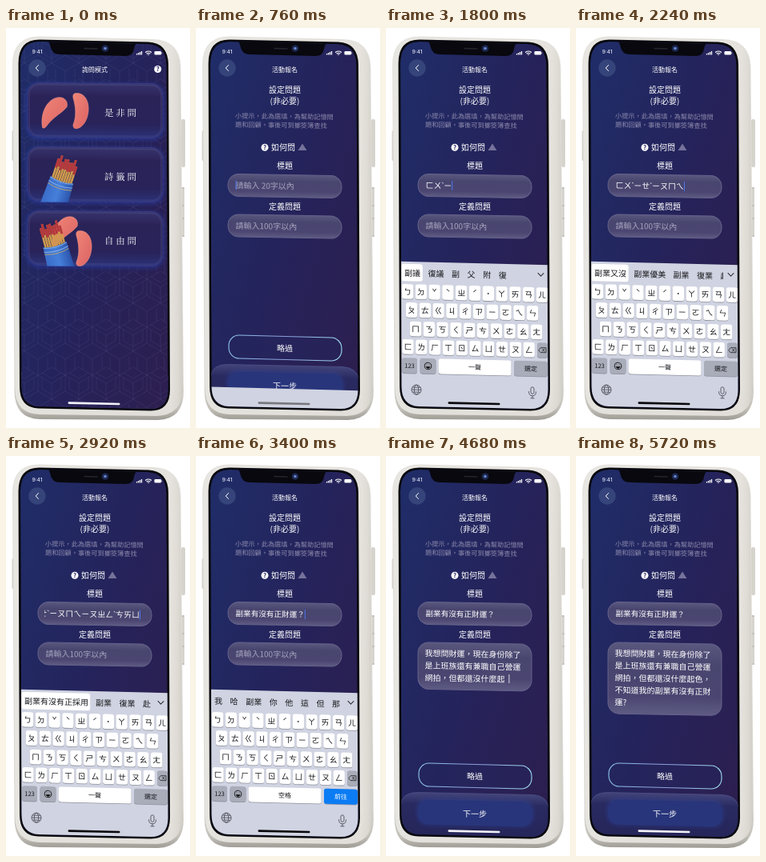
Write an HTML page that moves like this. It is 230 by 500 pixels and loops after 5760 ms.

```html
<!DOCTYPE html>
<html lang="zh-Hant">
<head>
<meta charset="utf-8">
<style>
html, body { margin: 0; width: 100%; height: 100%; overflow: hidden; background: #fff; }
svg { display: block; width: 230px; height: 500px; }
text { font-family: "Noto Sans CJK TC", "Noto Sans CJK", sans-serif; font-size: 10px; fill: #fff; }
.mid { text-anchor: middle; }
.dark { fill: #17181c; }
.hint { fill: #8d8aac; font-size: 8.2px; }
.ghost { fill: #a5a3bd; }
.typed { font-family: "Noto Sans", "Noto Sans CJK TC", sans-serif; }
.title { font-size: 9.6px; }
.serif { font-family: "Noto Serif CJK TC", "Noto Serif", "Noto Sans CJK TC", serif; font-size: 11.5px; letter-spacing: 2.8px; }
.line { fill: none; stroke: #fff; stroke-linecap: round; stroke-linejoin: round; }
</style>
</head>
<body>
<svg id="stage" viewBox="0 0 230 500"></svg>
<script>
const LOOP = 5760;
const ZHUYIN = 'ㄈㄨˋㄧㄝˋㄧㄡㄇㄟㄧㄡㄓㄥˋㄘㄞㄩㄣˋ';
const TITLE = '副業有沒有正財運';
const STORY = '我想問財運，現在身份除了是上班族還有兼職自己營運網拍，但都還沒什麼起色，不知道我的副業有沒有正財運?';
const PER_LINE = 12, LINE = 15.3;
const IDLE_WORDS = '我 哈 副業 你 他 這 但 那';
const SUGGESTIONS = [
  [1, '非 分 放 飛 復 法 發'],
  [2, '夫 副 父 附 復 福 富'],
  [4, '副議 復議 副 父 附 復'],
  [5, '副業 復業 副 父 附 復'],
  [7, '副業以 副業 復業 副 父'],
  [8, '副業有 副業 復業 副 父'],
  [10, '副業又沒 副業優美 副業 復業 趕'],
  [12, '副業有沒有 副業 復業 趕 赴'],
  [14, '副業有沒有正 副業 復業 赴'],
  [17, '副業有沒有正採用 副業 復業 赴'],
  [20, '副業有沒有正財運 副業 復業 赴']
];

// The screen leans slightly, more so towards the bottom.
const tilt = (y, body) => {
  const s = 0.008 + y * 0.000043;
  return `<g transform="matrix(1 ${s} 0 1 0 ${-s * 111})">${body}</g>`;
};
const label = (x, y, str, cls = '', extra = '') => `<text x="${x}" y="${y}" class="${cls}" ${extra}>${str}</text>`;
const box = (x, y, w, h, r, fill, extra = '') =>
  `<rect x="${x}" y="${y}" width="${w}" height="${h}" rx="${r}" fill="${fill}" ${extra}/>`;
const path = (d, extra = '') => `<path d="${d}" ${extra}/>`;
const gradient = (id, dir, ...colors) => `<linearGradient id="${id}" ${dir}>` +
  colors.map(([at, c]) => `<stop offset="${at}" stop-color="${c}"/>`).join('') + '</linearGradient>';
const DOWN = 'x2="0" y2="1"', ACROSS = 'x2="1"', DIAGONAL = 'x2="1" y2="1"';
const badge = (x, y) => `<circle cx="${x}" cy="${y}" r="4.5" fill="#fff"/>` +
  label(x, y + 2.8, '?', 'mid', 'style="fill:#28235f;font-size:8px;font-weight:800"');

const SCREEN = 'M18 44Q18 17 42 17L177 20Q200 21 200.500 46L202.500 452Q202.500 476 181 476L41 473Q19.500 472 19.500 448Z';

const defs = () => `<defs>
  <clipPath id="screen"><path d="${SCREEN}"/></clipPath>
  <clipPath id="words"><rect x="18" y="290" width="166" height="32"/></clipPath>
  <clipPath id="field"><rect x="48" y="184" width="121" height="28"/></clipPath>` +
  gradient('body', DOWN, [0, '#e4e1dc'], [0.9, '#dad7d1'], [0.97, '#c3c0b9'], [1, '#9f9c95']) +
  gradient('side', ACROSS, [0, '#e9e7e2'], [0.93, '#e6e3de'], [0.97, '#dedbd5'], [1, '#cfccc6']) +
  gradient('night', 'x1="0" y1=".15" x2="1" y2=".85"', [0, '#202c67'], [0.5, '#25235b'], [1, '#2c1f50']) +
  gradient('card', DOWN, [0, '#37346c'], [0.25, '#2a2358'], [0.75, '#29235a'], [1, '#2b3277']) +
  gradient('glass', DOWN, [0, '#5b587f'], [0.3, '#48456f'], [0.75, '#4a4671'], [1, '#5e5b83']) +
  gradient('dock', DOWN, [0, '#43457a'], [0.25, '#292a60'], [1, '#252559']) +
  gradient('rim', ACROSS, [0, '#8fc4ee'], [0.5, '#8a9bd8'], [1, '#9fdcf2']) +
  gradient('coral', DIAGONAL, [0, '#ee8577'], [1, '#dc6263']) +
  gradient('cup', ACROSS, [0, '#3a6cc8'], [0.5, '#457fda'], [1, '#2a51a8']) + `
  <pattern id="cubes" width="34" height="60" patternUnits="userSpaceOnUse" patternTransform="translate(6 4)">
    <path d="M17 0L34 10V30L17 40L0 30V10ZM0 10L17 20L34 10M17 20V40M17 40L0 50V60M17 40L34 50V60M0 0V10M34 0V10
      M5 13V27L17 34L29 27V13M5 7L17 14L29 7M12 47V60M22 47V60M12 0V3M22 0V3" fill="none" stroke="#6d69a8" stroke-width=".5" opacity=".3"/></pattern>
  <filter id="blur" x="-20%" y="-30%" width="140%" height="160%"><feGaussianBlur stdDeviation="2.500"/></filter>
</defs>`;

const phone = () =>
  box(219, 114, 5, 60, 2, '#d6d3cd') + box(219.5, 199, 3.5, 62, 1.5, '#d6d3cd') +
  path('M219 200H223M219 222H223M219 238H223M219 260H223', 'stroke="#aaa69f" stroke-width=".8"') +
  box(7.5, 128, 3, 38, 1.5, '#cfccc6') +
  path('M8 46Q8 10.500 42 10.500L184 14Q217 15 218.500 48L222 454Q222 489 190 490L42 489Q11 488 10.500 454Z', 'fill="url(#body)"') +
  path('M9 46Q9 11.500 42 11.500L184 15Q216 16 217.500 48L221 452Q220 484 188 485L42 483Q12 482 11.500 452Z', 'fill="url(#side)" opacity=".9"') +
  path('M15.500 44Q15.500 14.500 42 14.500L178 17.500Q202.500 18.500 203 46L205 452Q205 478.500 181 478.500L40 475.500Q17 474.500 17 448Z', 'fill="#08080e"');

const statusBar = () =>
  path('M51 14Q55 19 55.500 23Q57 33 68 33L149 35Q159 35 160 26Q161 20 165 18L165 14Z', 'fill="#08080e"') +
  path('M98 25.500L114 26', 'stroke="#25252c" stroke-width="1.5" stroke-linecap="round"') +
  '<circle cx="124" cy="25.5" r="4.3" fill="#1b2750"/><circle cx="124" cy="25.5" r="1.8" fill="#6a86c8"/>' +
  label(39, 32, '9:41', 'mid', 'style="font-family:Inter,sans-serif;font-size:6.700px;font-weight:500;fill:#d9dcec"') +
  path('M163.500 33.500V32M165.500 33.500V31M167.500 33.500V30M169.500 33.500V29', 'stroke="#fff" stroke-width="1.3"') +
  path('M174.500 30.300Q178 27.600 181.500 30.300M176 32Q178 30.500 180 32', 'class="line" stroke-width="1.1"') +
  '<circle cx="178" cy="33.2" r=".8" fill="#fff"/>' +
  box(185.5, 29, 8.5, 4.6, 1.3, '#fff') + box(194.4, 30.5, 0.7, 1.8, 0.3, '#fff');

const backButton = () => '<circle cx="39" cy="50" r="10.7" fill="#3d4c80" opacity=".75"/>' +
  path('M40.500 46.500L37.200 50L40.500 53.500', 'class="line" stroke-width="1"');
const heading = str => label(111, 54.8, str, 'mid', 'style="font-size:8px;font-weight:500"');

const moonLeft = 'M45.500 125C42 104 54 87 67 87C74 87 78 93 76 99C70 107 59 111 50 124Q47 127 45.500 125Z';
const moonRight = 'M86 82C98 80 104 91 103 104C102 116 95 126 87 126C83 125 83.500 121 85 118C88 109 87 98 84 88Q83 83 86 82Z';
const moon = (d, dx = 0, dy = 0) =>
  path(d, `fill="url(#coral)" stroke="#f09a8c" stroke-width=".5" transform="translate(${dx} ${dy})"`);

function stickCup(dx, dy, lean) {
  let sticks = '';
  for (let i = 0; i < 9; i++) {
    const x = -12 + i * 3, top = -24 - 3 * Math.sin(i * 2.1) - (i % 2) * 2;
    sticks += path(`M${x} 3V${top}`, 'stroke="#cf9a4c" stroke-width="2.6"') +
      path(`M${x} ${top * 0.5}V${top}`, 'stroke="#b5353d" stroke-width="2.8"');
  }
  return `<g transform="translate(${dx} ${dy}) rotate(${lean})">${sticks}` +
    path('M-15 0Q0 5 15 0L17 40H-17Z', 'fill="url(#cup)"') +
    path('M-15 1Q0 6 15 1M-15.500 6Q0 11 15.500 6', 'fill="none" stroke="#86aee6" stroke-width="1"') +
    path('M-15.500 9Q0 14 15.500 9', 'fill="none" stroke="#c9a866" stroke-width=".8"') + '</g>';
}

function menuCard(y, str, art) {
  const id = 'c' + y;
  return `<clipPath id="${id}">${box(26, y, 171, 69, 15, '#000')}</clipPath>` +
    box(25, y, 173, 71, 16, '#2b40b0', 'opacity=".5" filter="url(#blur)"') +
    box(27, y, 169, 68, 14, 'url(#card)', 'stroke="#39408a" stroke-width=".8"') +
    box(29, y + 2, 165, 64, 12, 'none', 'stroke="#6a67a5" stroke-width="2" opacity=".2"') +
    `<g clip-path="url(#${id})">${art}</g>` + label(123, y + 41, str, 'serif');
}

const menuPage = () => path(SCREEN, 'fill="url(#night)"') + path(SCREEN, 'fill="url(#cubes)"') +
  backButton() + heading('詢問模式') + badge(189.7, 51.5) +
  tilt(0, menuCard(69, '是非問', moon(moonLeft) + moon(moonRight)) +
    menuCard(149, '詩籤問', stickCup(70, 190, 18)) +
    menuCard(229, '自由問', moon(moonLeft, 13, 149) + moon(moonRight, 4, 172) + stickCup(61, 271, -15)));

const glassBox = (y, id) => box(40, y, 142, 28, 13.5, 'url(#glass)', `id="${id}" stroke="#65628a" stroke-width="1"`);

const formPage = () => path(SCREEN, 'fill="url(#night)"') + backButton() + heading('活動報名') +
  label(111, 81, '設定問題', 'mid', 'font-weight="500"') + label(111, 94.5, '(非必要)', 'mid', 'font-weight="500"') +
  tilt(112, label(49, 113.5, '小提示，此為選填，為幫助記憶問', 'hint') + label(49, 124.5, '題和回顧，事後可到擲筊簿查找', 'hint')) +
  badge(86, 149.3) + label(94, 153, '如何問', '', 'font-weight="500"') +
  path('M133 144.500L138.500 153H127.500Z', 'fill="#75729b"') +
  label(111, 175.7, '標題', 'mid', 'font-weight="500"') +
  tilt(198, glassBox(183.5, 'titleBox') + `<g clip-path="url(#field)">${label(49, 201.3, '', '', 'id="title"')}</g>` +
    box(49, 191.5, 0.9, 12, 0, '#4f7df5', 'id="caret"')) +
  label(111, 226.7, '定義問題', 'mid', 'font-weight="500"') +
  tilt(248, glassBox(234, 'storyBox') + '<g id="story"></g>' + box(49, 241.5, 0.8, 11, 0, '#fff', 'id="storyCaret"')) +
  tilt(400, box(41, 385.5, 141, 29, 13, '#25265f', 'fill-opacity=".5" stroke="url(#rim)" stroke-width="1.1"') +
    label(111, 404, '略過', 'mid')) +
  tilt(300, path('M18 440Q19 422 40 422H182Q202 422 204 440V480H18Z', 'fill="url(#dock)" stroke="#4d4f85" stroke-width=".8"') +
    box(38, 429, 147, 34, 14, '#2f48a8', 'opacity=".35" filter="url(#blur)"') +
    box(40, 431, 143, 31, 13, '#28357b') + label(111, 451, '下一步', 'mid', 'font-weight="500"'));

const key = (x, y, w, h, fill = '#fff') => box(x - w / 2, y - h / 2 + 0.8, w, h, 3, '#8e919d') + box(x - w / 2, y - h / 2, w, h, 3, fill);
const keyRow = (chars, x0, y) => [...chars].map((c, i) => {
  const x = x0 + i * 16.8;
  return key(x, y, 14.4, 18.6) + label(x, y + 3.8, c, 'mid dark');
}).join('');

const keyboard = () => tilt(400,
  box(10, 294, 200, 200, 0, '#d0d3e1') + '<g id="candidates"><g id="wordList" clip-path="url(#words)"></g>' +
  path('M190 304.500L193.500 308L197 304.500', 'class="line" style="stroke:#33353c" stroke-width="1.1"') + '</g>' +
  keyRow('ㄅㄉˇˋㄓˊ˙ㄚㄞㄢㄦ', 27, 331.5) + keyRow('ㄆㄊㄍㄐㄔㄗㄧㄛㄟㄣ', 32, 354.5) +
  keyRow('ㄇㄋㄎㄑㄕㄘㄨㄜㄠㄤ', 37, 378) + keyRow('ㄈㄌㄏㄒㄖㄙㄩㄝㄡㄥ', 27.5, 400.5) +
  key(195.5, 400.5, 13, 18.6, '#a9adba') +
  path('M191 400.500L193.500 397.500H200V403.500H193.500ZM195.500 399L198 402M198 399L195.500 402', 'class="line" style="stroke:#222" stroke-width=".8"') +
  key(29.5, 424, 19, 19, '#a9adba') + label(29.5, 427, '123', 'mid dark', 'style="font-size:7.500px"') +
  key(52.5, 424, 20, 19, '#a9adba') + '<circle cx="52.5" cy="424" r="4.3" fill="none" stroke="#222" stroke-width="1"/>' +
  path('M50 425Q52.500 429 55 425ZM51 422V423M54 422V423', 'stroke="#222" stroke-width=".9"') +
  key(111, 424, 91, 19) + label(111, 427, '', 'mid dark', 'id="space" style="font-size:8px"') +
  key(181, 424, 42, 19, '#a9adba') + box(160, 414.5, 42, 19, 3, '#0b7cf4', 'id="go"') +
  label(181, 427, '', 'mid', 'id="goText" style="font-size:8px"') +
  '<g fill="none" stroke="#50535d" stroke-width=".9"><circle cx="38" cy="454" r="6"/><ellipse cx="38" cy="454" rx="2.7" ry="6"/>' +
  path('M32 454H44M33 451H43M33 457H43') + box(181, 447, 4, 8.5, 2, 'none') +
  path('M178.500 452.500Q178.500 458 183 458T187.500 452.500M183 458V461M180.500 461H185.500') + '</g>');

stage.innerHTML = defs() + phone() + `<g clip-path="url(#screen)">
  <g id="form">${formPage()}</g><g id="keys">${keyboard()}</g>
  <g id="menu">${menuPage()}</g>
  ${tilt(300, box(77.5, 468, 65, 2.6, 1.3, '#fff', 'id="home"'))}${statusBar()}</g>`;

const $ = id => document.getElementById(id);
const set = (id, attrs) => { for (const k in attrs) $(id).setAttribute(k, attrs[k]); };
const ease = (t, from, to) => {
  const u = Math.min(1, Math.max(0, (t - from) / (to - from)));
  return (1 - Math.cos(Math.PI * u)) / 2;
};

function showTitle(t, typedCount) {
  const done = t >= 3200;
  const str = done ? TITLE + (t >= 3320 ? '？' : '') : ZHUYIN.slice(0, typedCount);
  const el = $('title');
  el.textContent = str || '請輸入 20字以內';
  el.setAttribute('class', !str ? 'ghost' : done ? 'title' : 'typed');
  const width = str ? el.getComputedTextLength() : 0;
  const x = Math.min(49.5, 167 - width);
  el.setAttribute('x', x);
  const blink = typedCount && !done ? 1 : t % 1000 < 300 ? 0.4 : 1;
  set('caret', { x: x + width, opacity: t > 620 && t < 3560 ? blink : 0 });
}

function showStory(t) {
  const n = Math.min(STORY.length, Math.max(0, Math.floor(3.01 + (t - 3880) / 25.5)));
  const rows = Math.max(1, Math.ceil(n / PER_LINE));
  let out = '';
  for (let i = 0; i < rows; i++) {
    out += label(48.5, 251.3 + i * LINE, STORY.slice(i * PER_LINE, Math.min(n, (i + 1) * PER_LINE)));
  }
  $('story').innerHTML = n ? out : label(49.5, 251.8, '請輸入100字以內', 'ghost');
  $('storyBox').setAttribute('height', 28 + (rows - 1) * LINE);
  const col = n - (rows - 1) * PER_LINE;
  set('storyCaret', {
    x: 48.5 + col * 10 + (n ? 5 : 0), y: 241.5 + (rows - 1) * LINE,
    opacity: t > 3600 && n < STORY.length ? 1 : 0
  });
}

function showKeyboard(t, typedCount) {
  const up = ease(t, 640, 1140) - ease(t, 3560, 4027);
  set('keys', { transform: `translate(0 ${(1 - up) * 182})`, visibility: up > 0 ? 'visible' : 'hidden' });
  $('home').setAttribute('fill', up > 0.05 ? (up > 0.2 ? '#08080c' : '#77777f') : '#f2f2f8');
  $('candidates').setAttribute('opacity', up > 0.98 ? 1 : 0);

  const composing = typedCount > 0 && t < 3200;
  const match = composing && SUGGESTIONS.filter(s => s[0] <= typedCount).pop();
  let x = 23, out = '';
  (match ? match[1] : IDLE_WORDS).split(' ').forEach((word, i) => {
    const w = word.length * 9.9;
    if (composing && !i) out += box(19.5, 297, w + 6.5, 21.5, 3, '#fff');
    out += label(x, 312, word, 'dark');
    x += w + 9.7;
  });
  $('wordList').innerHTML = out;
  $('space').textContent = composing ? '一聲' : '空格';
  $('goText').textContent = composing ? '選定' : '前往';
  $('goText').style.fill = composing ? '#17181c' : '#fff';
  $('go').setAttribute('opacity', composing ? 0 : 1);
}

function draw(t) {
  const typedCount = Math.min(ZHUYIN.length, Math.max(0, Math.floor((t - 1385) / 85)));
  const menuAlpha = 1 - ease(t, 40, 600);
  set('menu', { opacity: menuAlpha, visibility: menuAlpha > 0 ? 'visible' : 'hidden' });
  showTitle(t, typedCount);
  showStory(t);
  showKeyboard(t, typedCount);
}

const start = performance.now();
function tick() {
  draw((performance.now() - start) % LOOP);
  requestAnimationFrame(tick);
}
tick();
</script>
</body>
</html>
```
